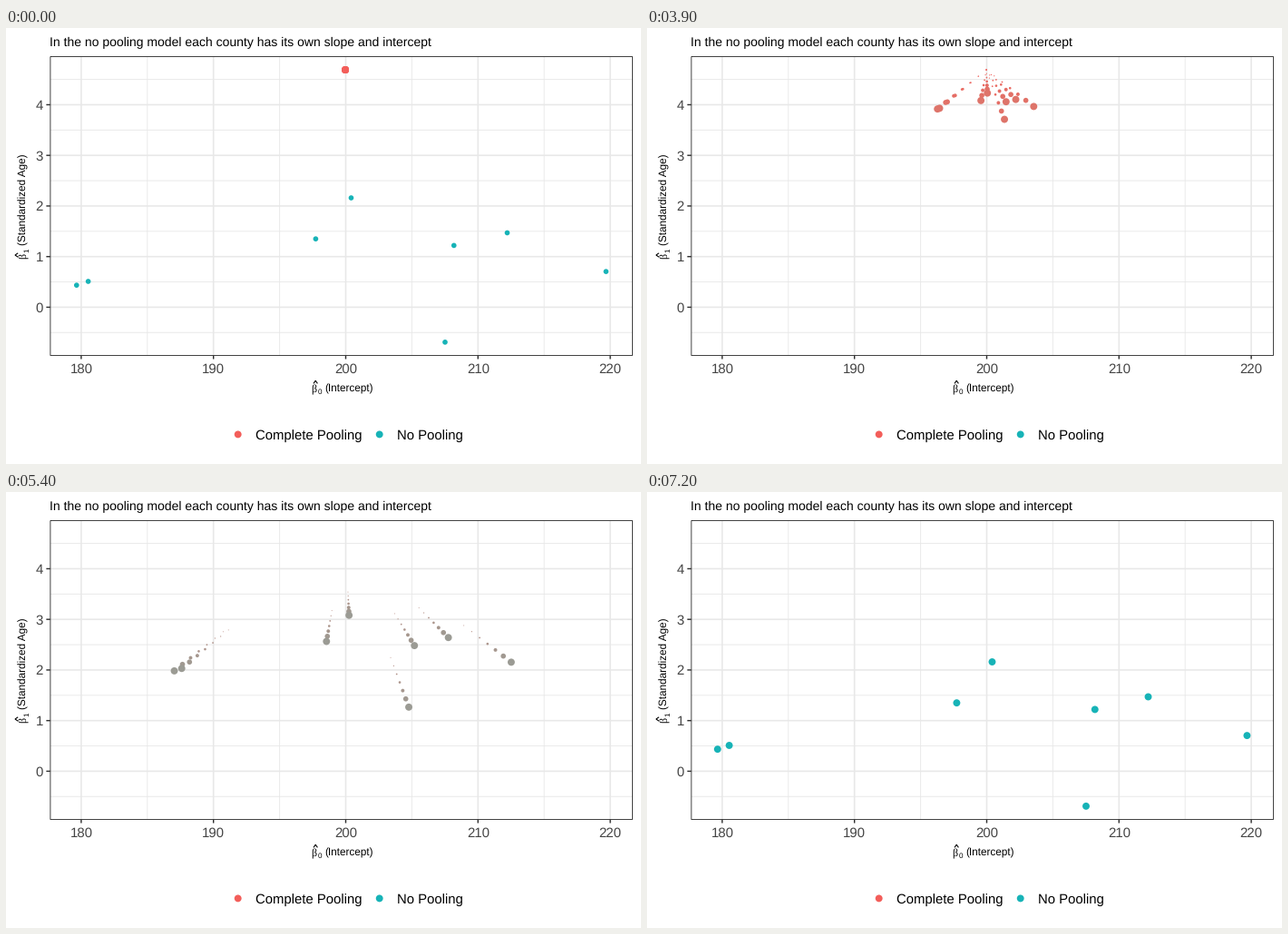
A matplotlib script that plays this animation: 700 by 480 pixels, repeating every 10 s.

```python
import numpy as np
import matplotlib.pyplot as plt
from matplotlib.animation import FuncAnimation

W, H, DPI = 700, 480, 100
FRAMES, STEP = 100, 100
MOVE_FROM, MOVE_LEN, WAKE = 33, 33, 6
R_HEAD, R_MIN = 3.95, 0.45
PT = 72 / DPI
RED, TEAL = "#F35E5A", "#17B3B7"
GRID, DARK, TICK_TEXT = "#E8E8E8", "#2E2E2E", "#444444"
LEFT, RIGHT, TOP, BOTTOM = 48.9, 690.5, 31.5, 360.5

plt.rcParams["text.hinting"] = "no_hinting"
plt.rcParams["font.family"] = "Liberation Sans"

# (intercept, slope) of the pooled fit and of each county
POOLED = np.array([199.97, 4.69])
COUNTIES = np.array([
    [179.65, 0.435], [180.53, 0.51], [197.73, 1.35], [200.41, 2.16],
    [207.51, -0.69], [208.18, 1.22], [212.21, 1.47], [219.68, 0.705]])


def px(v):
    return 82.9 + (v - 180) * 14.58


def py(v):
    return 307.4 - v * 55.73


# colour blending in CIE Lab
M = np.array([[0.4124, 0.3576, 0.1805],
              [0.2126, 0.7152, 0.0722],
              [0.0193, 0.1192, 0.9505]])
WHITE = M.sum(axis=1)


def to_lab(hex_code):
    c = np.array([int(hex_code[i:i + 2], 16) / 255 for i in (1, 3, 5)])
    lin = np.where(c > 0.04045, ((c + 0.055) / 1.055) ** 2.4, c / 12.92)
    x, y, z = np.cbrt(M @ lin / WHITE)
    return np.array([116 * y - 16, 500 * (x - y), 200 * (y - z)])


def to_rgb(lab):
    y = (lab[0] + 16) / 116
    f = np.array([y + lab[1] / 500, y, y - lab[2] / 200])
    lin = np.clip(np.linalg.solve(M, WHITE * f ** 3), 0, 1)
    c = np.where(lin > 0.0031308, 1.055 * lin ** (1 / 2.4) - 0.055, lin * 12.92)
    return np.clip(c, 0, 1)


LAB_RED, LAB_TEAL = to_lab(RED), to_lab(TEAL)


def area(r):
    return (2 * r * PT) ** 2


fig = plt.figure(figsize=(W / DPI, H / DPI), dpi=DPI, facecolor="white")
ax = fig.add_axes([0, 0, 1, 1])
ax.set_xlim(0, W)
ax.set_ylim(H, 0)
ax.axis("off")


def line(xs, ys, color, width, z=1):
    ax.plot(xs, ys, color=color, lw=width * PT, zorder=z, snap=False,
            solid_capstyle="butt", solid_joinstyle="miter")


def label(x, y, text, size, color="black", **kw):
    ax.text(x, y, text, fontsize=size * PT, color=color, va="baseline", **kw)


def draw_panel():
    for v in range(185, 220, 10):
        line([px(v)] * 2, [TOP, BOTTOM], GRID, 0.9)
    for v in np.arange(-0.5, 5):
        line([LEFT, RIGHT], [py(v)] * 2, GRID, 0.9)
    for v in range(180, 221, 10):
        line([px(v)] * 2, [TOP, BOTTOM], GRID, 1.6, 2)
        line([px(v)] * 2, [BOTTOM, BOTTOM + 4], DARK, 1.42)
        label(px(v), 380, str(v), 15, TICK_TEXT, ha="center")
    for v in range(5):
        line([LEFT, RIGHT], [py(v)] * 2, GRID, 1.6, 2)
        line([LEFT - 4.5, LEFT], [py(v)] * 2, DARK, 1.42)
        label(40.8, py(v) + 5.3, str(v), 15, TICK_TEXT, ha="right")
    line([LEFT, RIGHT, RIGHT, LEFT, LEFT], [TOP, TOP, BOTTOM, BOTTOM, TOP],
         DARK, 0.9, 5)


def draw_titles():
    label(48.5, 20, "In the no pooling model each county has its own "
          "slope and intercept", 14)

    label(404.4, 401, "(Intercept)", 11.7, ha="right")
    label(343.2, 403, "0", 8.2)
    label(336.4, 401, "β", 12, family="Liberation Serif")
    line([339, 341.2, 343.4], [391.4, 388.2, 391.4], "black", 1.1)

    up = dict(rotation=90, ha="right")
    label(23, 138.6, "(Standardized Age)", 11.7, rotation=90, ha="right") \
        if False else ax.text(23, 138.6, "(Standardized Age)",
                              fontsize=11.7 * PT, va="top",
                              rotation=90, ha="right",
                              rotation_mode="anchor", alpha=0)
    for y, x, text, size, family in (
            (239.4, 23, "(Standardized Age)", 11.7, "Liberation Sans"),
            (247, 25, "1", 8.2, "Liberation Sans"),
            (253.6, 23, "β", 12, "Liberation Serif")):
        label(x, y, text, size, rotation=90, ha="left",
              rotation_mode="anchor", family=family)
    line([13.2, 10, 13.2], [252.2, 250, 247.8], "black", 1.1)


def draw_legend():
    ax.scatter([255.7, 411.7], [447.4] * 2, s=area(R_HEAD),
               c=[RED, TEAL], linewidths=0, zorder=6)
    label(275.2, 453, "Complete Pooling", 14.9)
    label(431, 453, "No Pooling", 14.9)


draw_panel()
draw_titles()
draw_legend()
dots = ax.scatter([], [], linewidths=0, zorder=4)


def state(frame):
    t = np.clip((frame % FRAMES - MOVE_FROM) / MOVE_LEN, 0, 1)
    pos = POOLED + (COUNTIES - POOLED) * t
    rgb = to_rgb(LAB_RED + (LAB_TEAL - LAB_RED) * t)
    return np.column_stack([px(pos[:, 0]), py(pos[:, 1])]), rgb


def update(frame):
    n = len(COUNTIES)
    spots, sizes, colors = [], [], []
    # oldest wake first, current points on top
    for back in range(WAKE, -1, -1):
        xy, rgb = state(frame - back)
        fade = (1 - back / (WAKE + 1)) ** 2.5
        spots.append(xy)
        sizes += [area(R_MIN + (R_HEAD - R_MIN) * fade)] * n
        colors += [rgb] * n
    dots.set_offsets(np.vstack(spots))
    dots.set_sizes(sizes)
    dots.set_facecolors(colors)
    return [dots]


anim = FuncAnimation(fig, update, frames=FRAMES, interval=STEP,
                     repeat=True, repeat_delay=0, blit=False)
plt.show()
```
